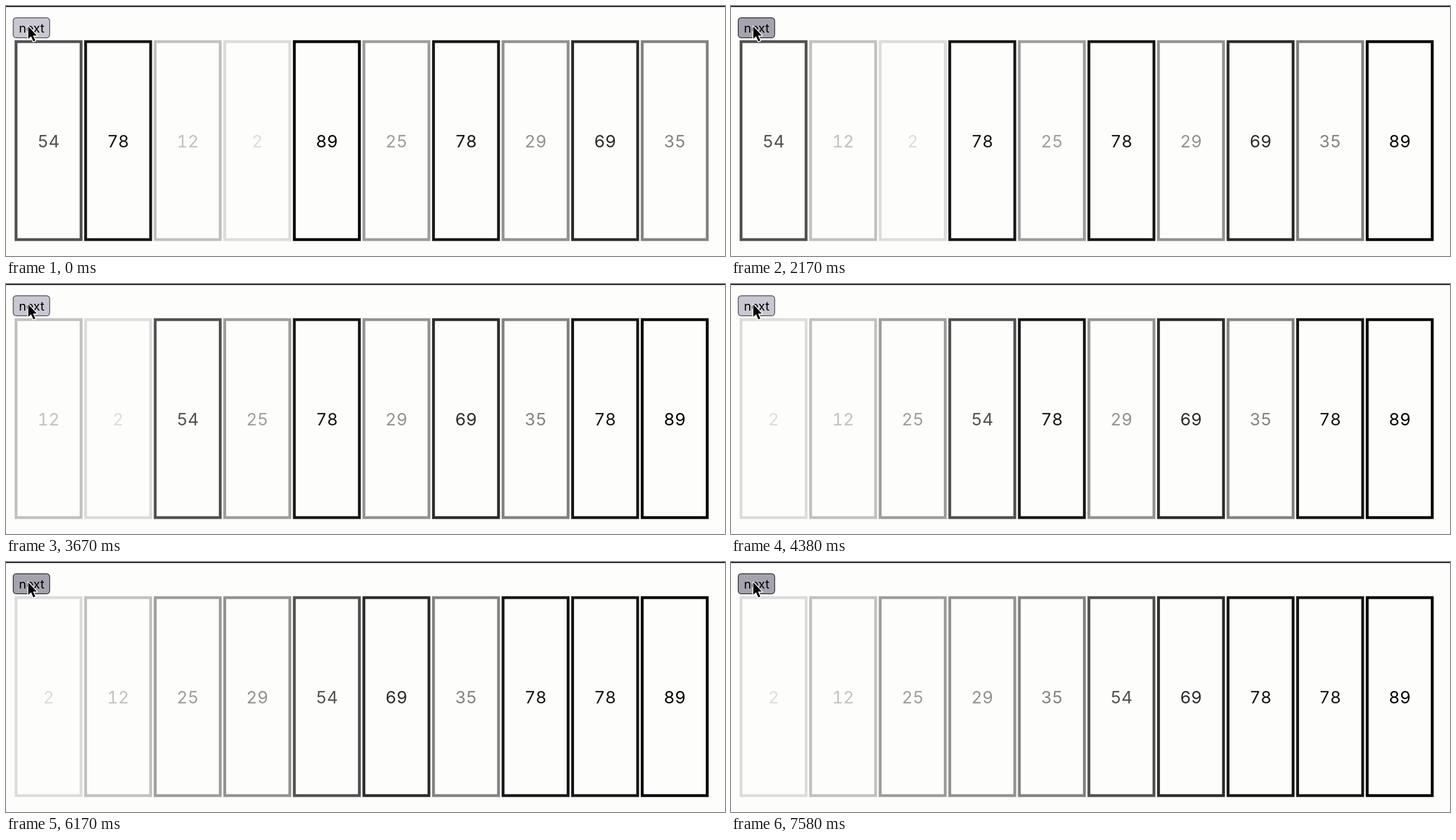
An HTML page for the animation above (7.62 s loop, 1267x442 px).

```html
<!DOCTYPE html>
<html lang="en">
<head>
<meta charset="utf-8">
<title>Bubble sort, step by step</title>
<style>
  html, body { margin: 0; width: 100%; height: 100%; overflow: hidden; background: #fdfdfb; }
  svg { display: block; width: 100%; height: 100%; }
  text { font-family: Inter, "Liberation Sans", sans-serif; text-anchor: middle; }
  .card text { font-size: 30px; font-variant-numeric: tabular-nums; }
</style>
</head>
<body>
<svg viewBox="0 0 1267 442">
  <rect width="1267" height="442" fill="#fdfdfb"/>
  <rect width="1267" height="1.7" fill="#08080f"/>
  <g id="cards"></g>
  <rect id="button" x="12.7" y="20.7" width="64.2" height="35.6" rx="5.5" stroke-width="1.5"/>
  <text x="45.2" y="47" font-size="22">next</text>
  <path d="M39.3 36V58L44.2 53.6L48.2 62.6L51.6 61.1L47.6 52.3H54.2Z"
        fill="#000" stroke="#fff" stroke-width="3" paint-order="stroke" stroke-linejoin="round"/>
</svg>
<script>
const LOOP = 7620;
const STEP = 210;         // time between clicks
const START = 95;         // the first comparison lands one step later
const PRESS = 125;        // the button goes down this long after a click
const LEFT = 15.2, PITCH = 122.6, WIDTH = 119.6, BORDER = 5;
const values = [54, 78, 12, 2, 89, 25, 78, 29, 69, 35];

const cardGroup = document.getElementById('cards');
const button = document.getElementById('button');

function add(parent, tag, attrs) {
  const el = document.createElementNS('http://www.w3.org/2000/svg', tag);
  for (const name in attrs) el.setAttribute(name, attrs[name]);
  return parent.appendChild(el);
}

function shade(value) {
  const c = Math.round(226 * (1 - value / 89) ** 1.1);
  return `rgb(${c},${c},${c})`;
}

const cards = values.map(value => {
  const card = add(cardGroup, 'g', { class: 'card' });
  const color = shade(value);
  add(card, 'rect', {
    x: BORDER / 2, y: 60.5 + BORDER / 2, width: WIDTH - BORDER, height: 355 - BORDER,
    fill: 'none', stroke: color, 'stroke-width': BORDER
  });
  add(card, 'text', { x: WIDTH / 2, y: 249.5, fill: color }).textContent = value;
  return card;
});

// Card order after each comparison of the bubble sort.
function sortStates() {
  const order = values.map((_, i) => i);
  const states = [order.slice()];
  for (let end = order.length - 1; end > 0; end--) {
    for (let i = 0; i < end; i++) {
      if (values[order[i]] > values[order[i + 1]]) {
        [order[i], order[i + 1]] = [order[i + 1], order[i]];
      }
      states.push(order.slice());
    }
  }
  return states;
}

const states = sortStates();

function draw(time) {
  const elapsed = time - START;
  const clicks = Math.max(0, Math.floor(elapsed / STEP));
  const pressed = elapsed >= 0 && elapsed % STEP >= PRESS;

  states[clicks].forEach((id, slot) => {
    cards[id].setAttribute('transform', `translate(${LEFT + slot * PITCH} 0)`);
  });
  button.setAttribute('fill', pressed ? '#a5a4ae' : '#c9c8d2');
  button.setAttribute('stroke', pressed ? '#34343c' : '#55555e');
}

const origin = performance.now();
function tick() {
  draw((performance.now() - origin) % LOOP);
  requestAnimationFrame(tick);
}
tick();
</script>
</body>
</html>
```
